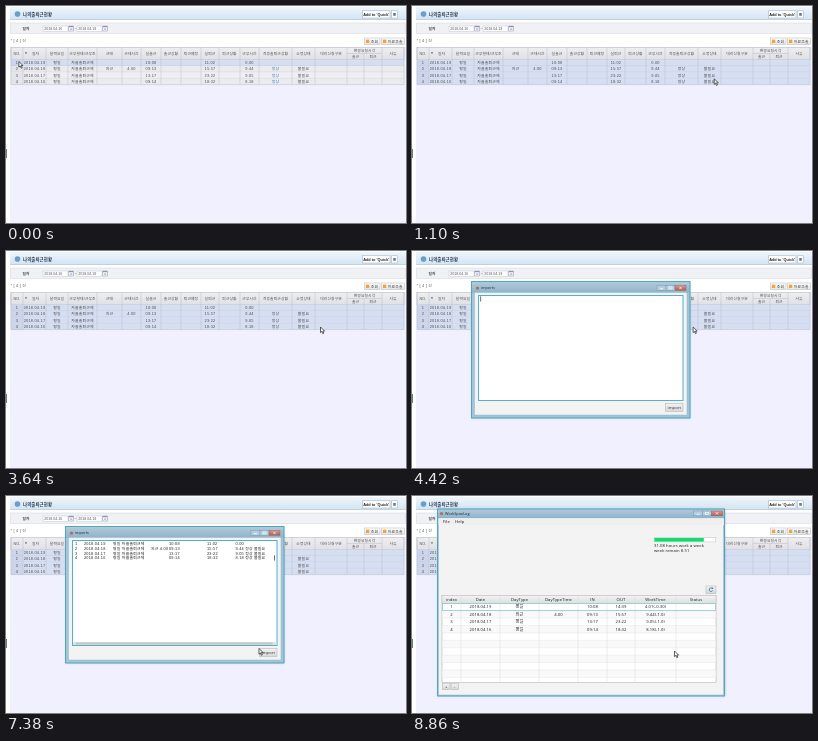
These frames come from a looping animation (400x217 px, 9.02 s). An HTML page with a canvas:

```html
<!DOCTYPE html>
<html lang="ko">
<head>
<meta charset="utf-8">
<title>출퇴근현황</title>
<style>
html, body { margin: 0; width: 100%; height: 100%; overflow: hidden; background: #fff; }
canvas { display: block; width: 400px; height: 217px; }
</style>
</head>
<body>
<canvas id="stage" width="400" height="217"></canvas>
<script>
const c = document.getElementById('stage').getContext('2d');
const LOOP = 9020;
const FONT = '"Liberation Sans","Noto Sans CJK KR","Noto Sans CJK JP",sans-serif';
const UI = '"Open Sans","Noto Sans CJK KR","Noto Sans CJK JP",sans-serif';

function rect(x, y, w, h, fill, stroke, line = 0.6) {
  if (fill) { c.fillStyle = fill; c.fillRect(x, y, w, h); }
  if (stroke) { c.strokeStyle = stroke; c.lineWidth = line; c.strokeRect(x, y, w, h); }
}

function shade(y, h, top, bottom) {
  const g = c.createLinearGradient(0, y, 0, y + h);
  g.addColorStop(0, top);
  g.addColorStop(1, bottom);
  return g;
}

function dot(x, y, r, fill) {
  c.fillStyle = fill;
  c.beginPath();
  c.arc(x, y, r, 0, 7);
  c.fill();
}

function path(points, color, width = 0.6) {
  c.strokeStyle = color;
  c.lineWidth = width;
  c.beginPath();
  points.forEach(([x, y]) => c.lineTo(x, y));
  c.stroke();
}

// Text is set at ten times its size and scaled down, so advances are not rounded.
function text(s, x, y, { size = 3.9, color = '#555', align = 'left', bold = '', font = FONT, gap = 0.2 } = {}) {
  c.save();
  c.translate(x, y + size * 0.34);
  c.scale(0.1, 0.1);
  c.font = `${bold} ${size * 10}px ${font}`;
  c.letterSpacing = `${gap * 10}px`;
  c.textAlign = align;
  c.fillStyle = color;
  c.fillText(s, 0, 0);
  c.restore();
}

const mid = (s, x, y, opts) => text(s, x, y, { align: 'center', ...opts });

function fade(alpha, draw) {
  if (alpha <= 0) return;
  c.save();
  c.globalAlpha = Math.min(alpha, 1);
  draw();
  c.restore();
}

// Attendance page
const EDGES = [5, 17, 40, 62, 91, 116, 135, 155, 175, 195, 213, 234, 253, 286, 309, 341, 358, 376, 398];
const HEADS = ['NO.', '일자', '달력요일', '근무형태/근무조', '근태', '근태시간', '실출근', '출근상황', '퇴근예정',
  '실퇴근', '퇴근상황', '근무시간', '최종출퇴근상황', '소명상태', '대리신청구분', '출근', '퇴근', '사유'];
const DAYS = [
  { date: '2018.04.19', in: '10:08', out: '11:02', hours: '0.00' },
  { date: '2018.04.18', in: '09:13', out: '15:57', hours: '9.44', off: '외근', offTime: '4.00', state: '정상', need: '불필요' },
  { date: '2018.04.17', in: '13:17', out: '23:22', hours: '9.05', state: '정상', need: '불필요' },
  { date: '2018.04.16', in: '09:14', out: '18:32', hours: '8.18', state: '정상', need: '불필요' }
];
const ROW_TOP = 53.8, ROW_H = 6.2;
const center = i => (EDGES[i] + EDGES[i + 1]) / 2;

function calendar(x) {
  rect(x, 20, 4.6, 5, '#f8f8fa', '#8b95a8', 0.5);
  rect(x, 20, 4.6, 1.2, '#8b97ae');
  rect(x + 1.3, 22.4, 2.2, 1.5, '#b6bdcb');
}

function toolButton(x, w, label) {
  rect(x, 32, w, 6.5, shade(32, 6.5, '#fff', '#e6e6ea'), '#b5b5bb', 0.5);
  rect(x + 1.4, 33.6, 3.4, 3.4, '#f0a43c');
  text(label, x + 6.2, 35.3, { color: '#444' });
}

function page(selected) {
  rect(0, 0, 400, 217, '#fff');
  rect(4, 1, 396, 12.5, shade(1, 12.5, '#eff5fb', '#d3e4f3'));
  rect(4, 13, 396, 0.8, '#b4cbe0');
  dot(11.5, 8, 2.8, '#6a9fc9');
  text('나의출퇴근현황', 17, 8.3, { size: 4.4, bold: 'bold', color: '#26364c', gap: 0.1 });
  rect(356.5, 4.8, 27.5, 7.2, '#fff', '#9aa8b8', 0.5);
  mid("Add to 'Quick'", 370.2, 8.3, { bold: 'bold', color: '#222', gap: 0 });
  rect(385.5, 4.8, 6, 7.2, '#fff', '#9aa8b8', 0.5);
  rect(387.2, 7, 2.6, 2.8, '#6c7a8c');

  rect(4.5, 17, 395, 10.5, '#f0f1f4', '#d8dbe2', 0.6);
  text('일자', 16.5, 22.3, { bold: 'bold', size: 3.7, color: '#444' });
  [['2018.04.16', 37], ['2018.04.19', 71]].forEach(([date, x]) => {
    rect(x, 20, 25, 5.2, '#fff', '#c0c5ce', 0.5);
    text(date, x + 1.2, 22.7, { size: 3.6, gap: 0 });
    calendar(x + 25.8);
  });
  text('~', 68.6, 22.6);
  text('* [ 4 ] 건', 4.5, 34.5);
  toolButton(358.5, 15.5, '조회');
  toolButton(375.5, 23, '자료추출');

  rect(4, 41, 396, 176, '#f0f0ff');
  rect(5, 41.3, 393, 12.5, shade(41, 12.5, '#efeff1', '#e0e1e6'), '#b0b5c2', 0.5);
  HEADS.forEach((head, i) => {
    const split = i === 15 || i === 16;
    mid(head, center(i) + (i === 1 ? 1 : 0), split ? 50.5 : 47.4, { size: 3.8, gap: 0.1 });
  });
  mid('변경요청시각', 358.5, 44.5, { size: 3.8, gap: 0.1 });
  mid('♦', 20, 47);
  path([[341, 47.5], [376, 47.5]], '#b8bdca', 0.5);

  DAYS.forEach((day, i) => {
    const top = ROW_TOP + i * ROW_H, y = top + ROW_H / 2, on = i < selected;
    rect(5, top, 393, ROW_H, on ? '#d6def2' : i % 2 ? '#ebebee' : '#efeff1');
    rect(5, top, 12, ROW_H, on ? '#ccd5ea' : '#e5e5e9');
    path([[5, top + ROW_H], [398, top + ROW_H]], '#b6bccb', 0.5);
    const cells = { 0: i + 1, 1: day.date, 2: '평일', 3: '자율출퇴근제', 4: day.off, 5: day.offTime,
      6: day.in, 9: day.out, 11: day.hours, 12: day.state, 13: day.need };
    for (const k in cells) {
      const link = k === '12' && !on;
      if (cells[k]) mid(cells[k], center(+k), y, { color: link ? '#3a78c8' : '#4c4c50' });
    }
  });
  EDGES.forEach((x, i) => path([[x, i === 16 ? 47.5 : 41.3], [x, ROW_TOP + 4 * ROW_H]], '#b6bccb', 0.5));
  rect(0, 143, 0.8, 9, '#3c5a68');
}

// Desktop windows
function frame(x, y, w, h, inset, title) {
  const bar = inset + 8, top = y + inset + 1, r = x + w - inset;
  c.save();
  c.shadowColor = 'rgba(0,30,50,.3)';
  c.shadowBlur = 2;
  rect(x, y, w, h, '#a4c4d8');
  c.restore();
  rect(x, y, w, bar, shade(y, bar, '#b2cadb', '#90b4cb'));
  rect(x, y, w, h, null, '#46a3b9', 0.9);
  rect(x + inset, y + bar, w - 2 * inset, h - bar - inset, '#f3f3f3', '#7fb0c4', 0.4);
  dot(x + inset + 3, top + 2.6, 1.7, '#b0705c');
  text(title, x + inset + 6.5, top + 2.7, { size: 3.8, color: '#1c2a33', font: UI, gap: 0 });
  rect(r - 30, top, 9, 4.8, '#b5cddd', '#6f91a6', 0.4);
  rect(r - 21, top, 9, 4.8, '#b5cddd', '#6f91a6', 0.4);
  rect(r - 12, top, 11, 4.8, shade(top, 4.8, '#d39a91', '#bd5a4d'), '#865a58', 0.4);
  rect(r - 27, top + 2.8, 3, 0.8, '#fff');
  rect(r - 18, top + 1.4, 3, 2, null, '#fff', 0.6);
  path([[r - 7.7, top + 1.2], [r - 5.3, top + 3.6]], '#fff', 0.7);
  path([[r - 5.3, top + 1.2], [r - 7.7, top + 3.6]], '#fff', 0.7);
}

function button(x, y, w, h, label, size) {
  rect(x, y, w, h, shade(y, h, '#f4f4f4', '#d8d8d8'), '#acacac', 0.5);
  mid(label, x + w / 2, y + h / 2, { size, color: '#333', font: UI, gap: 0 });
}

function importDialog(pasted, caret) {
  frame(59.5, 30.5, 218.5, 136.5, 3, 'imports');
  rect(66.5, 44.5, 204.5, 105, '#fff', '#4fb0d0', 1);
  if (pasted) {
    DAYS.forEach((day, i) => {
      const y = 48 + i * 4.65;
      const put = (s, x) => s && text(s, x, y, { color: '#222' });
      put(String(i + 1), 69);
      put(day.date, 78);
      put('평일 자율출퇴근제', 107);
      put(day.off && `${day.off} ${day.offTime}`, 145);
      put(day.in, 163);
      put(day.out, 201);
      put([day.hours, day.state, day.need].filter(Boolean).join(' '), 229.5);
    });
    rect(67, 146, 203.5, 3, '#e2e2e2');
    rect(69.5, 146.5, 197, 2, '#c6c6c6');
  }
  if (caret) rect(pasted ? 268.2 : 68.4, pasted ? 59.3 : 45.3, 0.7, 5.2, '#333');
  button(253.5, 152.3, 17.5, 8, 'import', 4.2);
}

const COLS = [30, 49, 88, 127, 166, 195, 223, 264, 304];
const TITLES = ['index', 'Date', 'DayType', 'DayTypeTime', 'IN', 'OUT', 'WorkTime', 'Status'];

function summary() {
  const ui = { size: 4.2, color: '#1a1a1a', font: UI, gap: 0.05 };
  rect(26.5, 22.5, 285.5, 6.6, '#efefef');
  text('File', 31, 25.6, ui);
  text('Help', 43, 25.6, ui);
  rect(242.3, 41.6, 61.5, 4.3, '#fff', '#c0c0c0', 0.5);
  rect(242.5, 42, 49.3, 3.6, '#10db70');
  text('31.08 hours work a week', 242, 50, ui);
  text('week remain 8.51', 242, 54.5, ui);
  button(294, 90, 10, 7.4, '', 4);
  c.strokeStyle = '#2f7fa8';
  c.lineWidth = 0.9;
  c.beginPath();
  c.arc(299, 93.7, 1.8, 0.4, 5.6);
  c.stroke();
  rect(299.8, 91.6, 1.4, 1.4, '#2f7fa8');

  rect(30, 99.5, 274, 87, '#fff', '#b8b8b8', 0.6);
  rect(30, 99.5, 274, 7.8, shade(99.5, 7.8, '#f3f3f3', '#dedede'), '#bdbdbd', 0.5);
  for (let i = 0; i < 11; i++) {
    const y = 107.3 + i * 7.4;
    if (i % 2) rect(30.3, y, 273.4, Math.min(7.4, 186.3 - y), '#f9f9f9');
    path([[30, y], [304, y]], '#e4e4e4', 0.5);
  }
  COLS.forEach(x => path([[x, 99.5], [x, 186.5]], '#d9d9d9', 0.5));
  rect(30.4, 107.6, 273.2, 6.9, null, '#7cc9cf', 0.7);
  const at = i => (COLS[i] + COLS[i + 1]) / 2;
  TITLES.forEach((s, i) => mid(s, at(i), 103.5, ui));
  DAYS.forEach((day, i) => {
    const first = i === 0;
    [i + 1, day.date, day.off || '평일', day.offTime, day.in, first ? '14:39' : day.out,
      first ? '4.01(-0.30)' : day.hours + '(-1.0)']
      .forEach((s, k) => s && mid(s, at(k), 111 + i * 7.4, ui));
  });
  button(30.5, 187.2, 7.5, 6.3, '+', 4.2);
  button(39, 187.2, 7.5, 6.3, '-', 4.2);
}

// Pointer: [time, x, y] of the tip
const MOVES = [
  [0, 12.5, 55.5], [660, 268.5, 68.5], [920, 297, 71.5], [1580, 316, 76], [1720, 316, 76], [1840, 314.5, 76],
  [4320, 314.5, 76], [4420, 281.5, 76], [4900, 91, 70], [6700, 91, 70],
  [7380, 253, 152.5], [7600, 259.5, 155], [7800, 262.5, 155], [LOOP, 262.5, 155]
];

function pointer(t) {
  const n = MOVES.findIndex(m => m[0] > t);
  const [t0, x0, y0] = MOVES[n - 1], [t1, x1, y1] = MOVES[n];
  const k = (t - t0) / (t1 - t0);
  return [x0 + (x1 - x0) * k, y0 + (y1 - y0) * k];
}

function shape(points, x, y) {
  c.beginPath();
  points.forEach(([a, b]) => c.lineTo(x + a, y + b));
  c.closePath();
  c.fillStyle = '#fff';
  c.fill();
  c.strokeStyle = '#222';
  c.lineWidth = 0.7;
  c.stroke();
}

function cursor(t, x, y) {
  const editing = t > 4320 && t < 8360 && x > 67 && x < 270 && y > 45 && y < 149;
  const linked = t < 940 && x > 262 && x < 276;
  if (editing) {
    path([[x - 1.3, y - 3], [x + 1.3, y - 3]], '#333', 0.7);
    path([[x, y - 3], [x, y + 3]], '#333', 0.8);
    path([[x - 1.3, y + 3], [x + 1.3, y + 3]], '#333', 0.7);
  } else if (linked) {
    shape([[0.8, 0], [1.8, 0], [2, 2.6], [4.8, 3.2], [4.6, 6.4], [1.4, 6.4], [-0.6, 3.6], [0.8, 4]], x, y);
  } else {
    shape([[0, 0], [0, 5.6], [1.3, 4.4], [2.3, 6.7], [3.3, 6.2], [2.3, 4.1], [4.1, 4.1]], x, y);
  }
}

function draw(t) {
  const [x, y] = pointer(t);
  const selected = t < 940 ? Math.min(3, Math.floor((y - ROW_TOP) / ROW_H) + 1) : 4;
  page(selected);
  if (t < 8440) fade((t - 3860) / 60, () => {
    const hidden = (t >= 4620 && t < 5120) || (t >= 7440 && t < 7940);
    importDialog(t >= 6020, !hidden);
  });
  fade((t - 8340) / 100, () => frame(25.5, 13, 287, 187, 1, 'WorkSpanLog'));
  fade((t - 8800) / 60, summary);
  cursor(t, x, y);
}

const start = performance.now();
function tick() {
  draw((performance.now() - start) % LOOP);
  requestAnimationFrame(tick);
}
tick();
</script>
</body>
</html>
```
